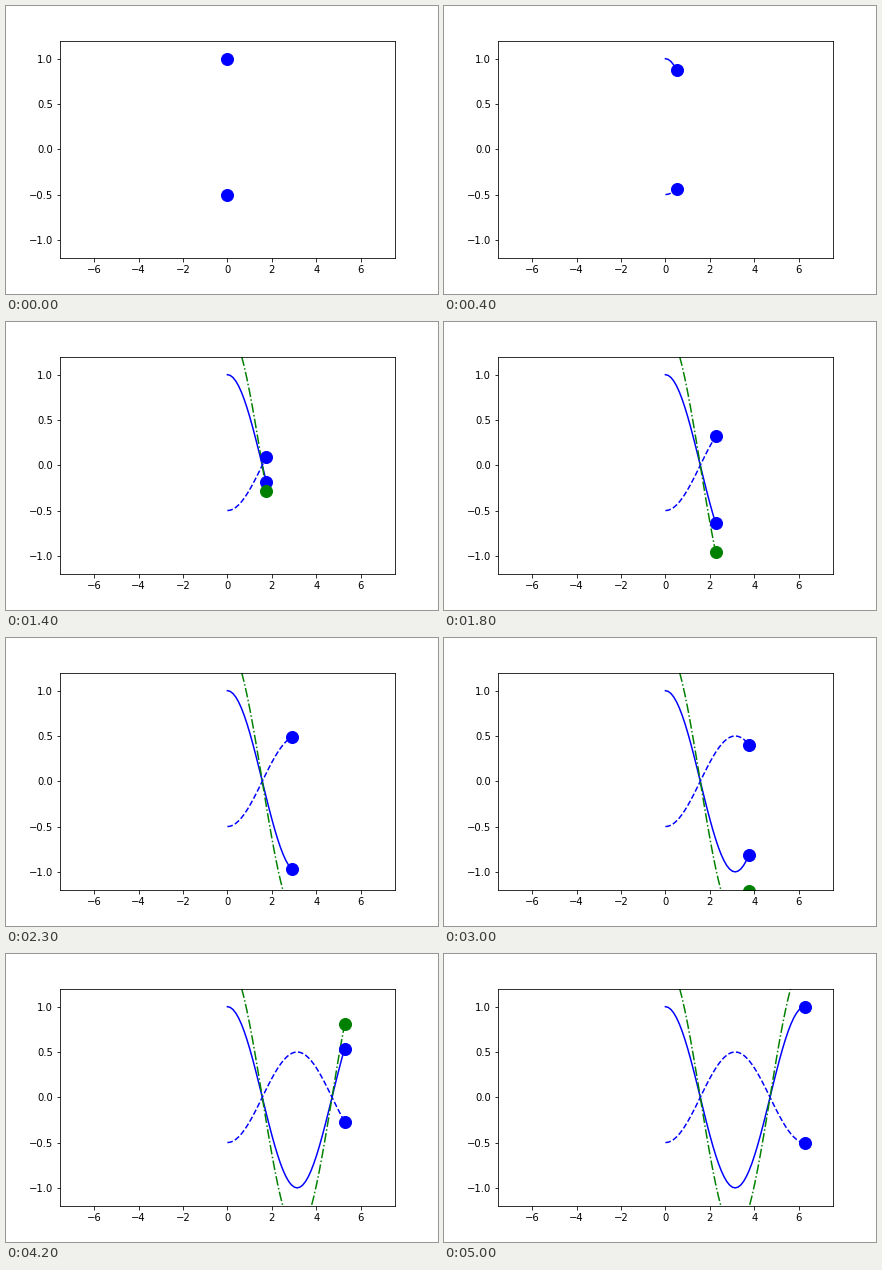
These frames come from a looping animation (432 by 288 pixels, 5.1 s). A matplotlib script:

```python
import numpy as np
import matplotlib.pyplot as plt
from matplotlib.animation import FuncAnimation

STEPS = 51
t = np.linspace(0, 2 * np.pi, STEPS)

# amplitude, colour, line style
WAVES = [
    (1.0, "blue", "-"),
    (-0.5, "blue", "--"),
    (1.5, "green", "-."),
]

plt.rcParams["font.family"] = "DejaVu Sans"
fig, ax = plt.subplots(figsize=(6, 4), dpi=72)
fig.subplots_adjust(left=0.125, right=0.9, bottom=0.125, top=0.88)
ax.set_xlim(-2.4 * np.pi, 2.4 * np.pi)
ax.set_ylim(-1.2, 1.2)

curves = [ax.plot([], [], color=color, ls=style)[0] for _, color, style in WAVES]
dots = [ax.plot([], [], "o", color=color, ms=12)[0] for _, color, _ in WAVES]


def update(i):
    x = t[:i + 1]
    for (amp, _, _), curve, dot in zip(WAVES, curves, dots):
        y = amp * np.cos(x)
        curve.set_data(x, y)
        dot.set_data(x[-1:], y[-1:])
    return curves + dots


anim = FuncAnimation(fig, update, frames=STEPS, interval=100, repeat=True)
plt.show()
```
